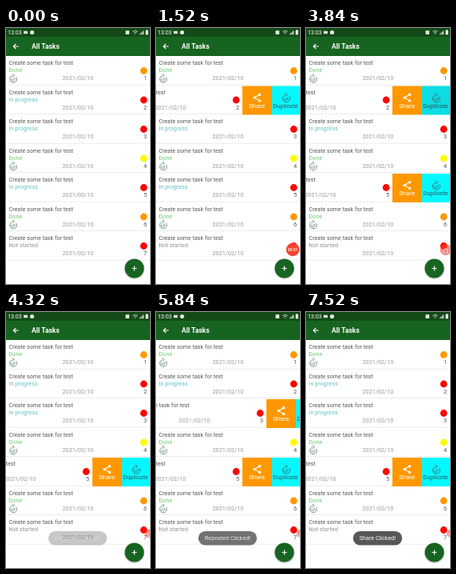
An HTML page with a canvas that plays this animation: 180x320 px, repeating every 8 s.

```html
<!DOCTYPE html>
<html lang="en">
<head>
<meta charset="utf-8">
<title>Task list</title>
<style>
  html, body { margin: 0; width: 100%; height: 100%; overflow: hidden; background: #fff; }
  canvas { display: block; width: 180px; height: 320px; }
</style>
</head>
<body>
<canvas id="stage"></canvas>
<script>
const LOOP = 8000, STEP = 80, OPEN = 72, ROW_H = 36.5, TOP = 35;
const GREEN = '#176420', DARK_GREEN = '#144a18';
const ORANGE = '#ff9800', RED = '#fb0505', YELLOW = '#fffa00', CYAN = '#06f8ff';
const STATUS_COLORS = { 'Done': '#6ccb72', 'In progress': '#5cc4c8', 'Not started': '#939393' };
const rows = [
  ['Done', ORANGE], ['In progress', RED], ['In progress', RED], ['Done', YELLOW],
  ['In progress', RED], ['Done', ORANGE], ['Not started', RED]
];

const canvas = document.getElementById('stage');
const ctx = canvas.getContext('2d');
const ratio = window.devicePixelRatio || 1;
canvas.width = 180 * ratio;
canvas.height = 320 * ratio;

const ramp = (t, a, b) => Math.min(1, Math.max(0, (t - a) / (b - a)));
const ease = (t, a, b) => { const p = ramp(t, a, b); return p * p * (3 - 2 * p); };

function rect(x, y, w, h, color) {
  ctx.fillStyle = color;
  ctx.fillRect(x, y, w, h);
}

function disc(x, y, r, color) {
  ctx.fillStyle = color;
  ctx.beginPath();
  ctx.arc(x, y, r, 0, 7);
  ctx.fill();
}

function stroke(path, color, width) {
  ctx.strokeStyle = color;
  ctx.lineWidth = width;
  ctx.stroke(new Path2D(path));
}

function text(str, x, y, size, color, align = 'left', weight = 400) {
  ctx.font = `${weight} ${size}px Roboto, sans-serif`;
  ctx.textAlign = align;
  ctx.textBaseline = 'alphabetic';
  ctx.fillStyle = color;
  ctx.fillText(str, x, y);
}

function at(x, y, scale, draw) {
  ctx.save();
  ctx.translate(x, y);
  ctx.scale(scale, scale);
  draw();
  ctx.restore();
}

function repeatIcon(x, y, scale, color) {
  at(x, y, scale, () => {
    stroke('M-1 -2.6A3.8 3.8 0 1 0 3.4 -1.2M-1 -4.6L1.4 -3L-.6 -1.4', color, 0.8);
    stroke('M-2 .8A2 2 0 1 0 1.6 -.2L-.2 1.6L-1.2 .6', color, 0.7);
  });
}

function shareIcon(x, y) {
  stroke(`M${x + 3} ${y - 3.8}L${x - 3.4} ${y}L${x + 3} ${y + 3.8}`, '#fff', 1.1);
  for (const [dx, dy] of [[3, -3.8], [-3.4, 0], [3, 3.8]]) disc(x + dx, y + dy, 1.7, '#fff');
}

function drawRow(i, offset, press) {
  const y = TOP + i * ROW_H;
  const [status, color] = rows[i];
  ctx.save();
  ctx.translate(-offset, y);
  text('Create some task for test', 3.5, 11.2, 7.15, '#585858');
  text(status, 3.5, 20.3, 7.25, STATUS_COLORS[status]);
  if (status === 'Done') repeatIcon(8.8, 27.8, 1.15, '#6b8a74');
  text('2021/02/10', 70.5, 30, 7.3, '#999');
  disc(172.2, 18.5, 4.4, color);
  text(i + 1, 174, 30.2, 7.3, '#555', 'center');
  rect(0, 35.8, 180, 0.7, '#e4e4e4');
  if (offset > 0) {
    rect(180, 1, 37, 36, ORANGE);
    rect(217, 1, 35, 36, CYAN);
    shareIcon(198.6, 15.6);
    text('Share', 198.1, 28.4, 7.8, '#fff', 'center');
    repeatIcon(234.6, 15.6, 1.2, '#3d7478');
    text('Duplicate', 233.9, 28.4, 7.5, '#2f5a60', 'center');
    if (press.share) rect(180, 1, 37, 36, `rgba(70,50,40,${press.share})`);
    if (press.copy) rect(217, 1, 35, 36, `rgba(60,60,60,${press.copy})`);
  }
  ctx.restore();
}

function drawHeader() {
  const pale = '#dfe8df';
  rect(0, 0, 180, TOP, GREEN);
  rect(0, 0, 180, 11, DARK_GREEN);
  text('13:03', 2, 8.1, 7.2, '#fff');
  rect(22, 3.8, 5, 3.4, pale);
  disc(32.6, 5.5, 2.6, pale);
  rect(149.5, 3.2, 4.6, 4.8, pale);
  stroke('M158.5 4.6q3 -2.6 6 0M159.8 6.2q1.7 -1.4 3.4 0M161.5 7.4v.8', pale, 0.9);
  for (let k = 0; k < 4; k++) rect(167 + k * 1.4, 7 - k * 1.2, 1, 1.2 + k * 1.2, pale);
  rect(174.6, 3, 3, 5.4, '#fff');
  rect(175.4, 2.2, 1.4, 1, '#fff');
  stroke('M15.8 23H9.4M12.4 20L9.3 23L12.4 26', '#fff', 1.1);
  text('All Tasks', 32, 26, 8.5, '#fff', 'left', 700);
}

function drawBubble(t) {
  if (t < 80) return;
  const tuck = ease(t, 2000, 2400), hide = ease(t, 4000, 4480);
  const x = 171 + 3.5 * tuck + 6.5 * hide;
  ctx.save();
  ctx.globalAlpha = 1 - 0.4 * tuck;
  disc(x, 277, t < 160 ? 5 : 8.3 - 1.3 * tuck - 2 * hide, '#f4442e');
  if (tuck < 0.5) {
    if (t >= 320) text('00:01', x, 279, 5, '#fff', 'center', 500);
  } else {
    stroke(`M${x - 3} 278L${x} 275L${x + 3} 278M${x - 2} 278v3h4v-3`, '#fff', 1);
  }
  ctx.restore();
}

function drawToast(str, alpha) {
  if (alpha <= 0) return;
  ctx.save();
  ctx.globalAlpha = alpha;
  ctx.font = '400 7.2px Roboto, sans-serif';
  const w = ctx.measureText(str).width + 16;
  ctx.fillStyle = '#555759';
  ctx.beginPath();
  ctx.roundRect(89.5 - w / 2, 274, w, 17.5, 8.7);
  ctx.fill();
  text(str, 89.5, 285.2, 7.2, '#fff', 'center');
  ctx.restore();
}

function draw(t) {
  ctx.setTransform(ratio, 0, 0, ratio, 0, 0);
  rect(0, 0, 180, 320, '#fff');

  const offsets = {
    1: OPEN * (ease(t, 960, 1520) - ease(t, 3920, 4320)),
    2: OPEN * (ease(t, 5440, 6160) - ease(t, 6960, 7280)),
    4: OPEN * ease(t, 2000, 2740)
  };
  const presses = {
    1: { copy: t >= 3840 ? 0.14 : 0 },
    2: { share: t >= 6800 ? 0.25 : 0 }
  };
  rows.forEach((_, i) => drawRow(i, offsets[i] || 0, presses[i] || {}));

  drawHeader();
  drawBubble(t);
  disc(160.5, 301.5, 12.8, 'rgba(0,0,0,.16)');
  disc(160.5, 300.5, 12, GREEN);
  stroke('M157.5 300.5h6M160.5 297.5v6', '#fff', 1.2);

  drawToast('Repeated Clicked!', ramp(t, 4160, 4640) - ramp(t, 5760, 6240));
  drawToast('Share Clicked!', ramp(t, 7040, 7520));
}

function tick(now) {
  draw(Math.floor((now % LOOP) / STEP) * STEP);
  requestAnimationFrame(tick);
}
draw(0);
requestAnimationFrame(tick);
</script>
</body>
</html>
```
